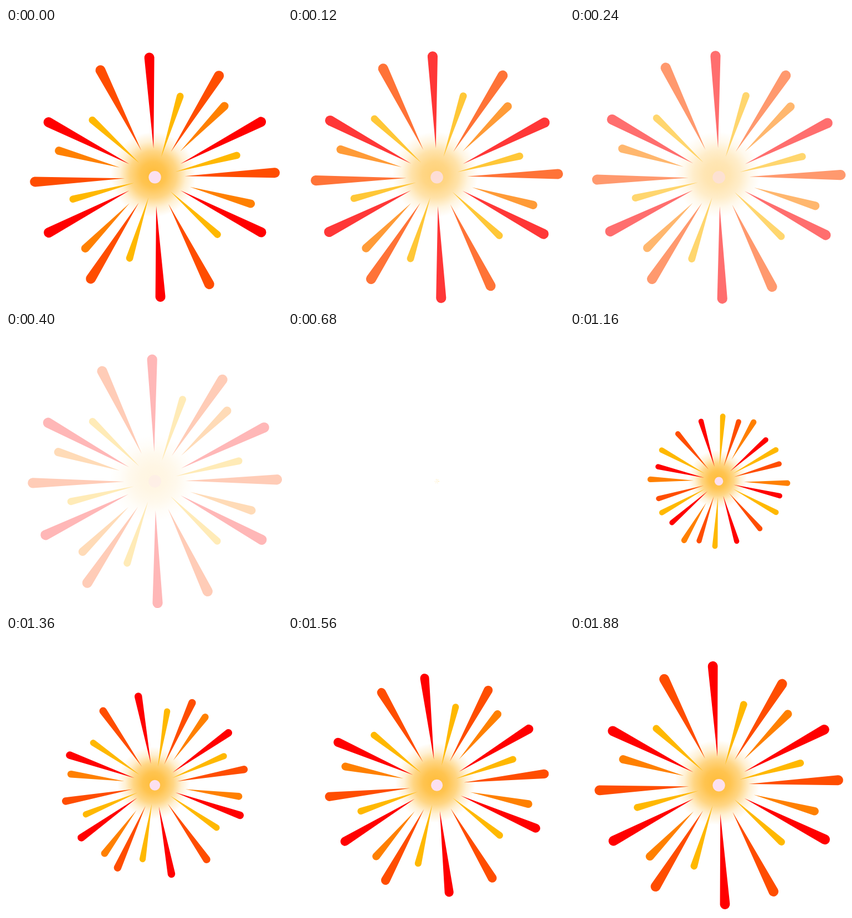
Animation of 498x498 px, one loop 1.92 s. Source, as an HTML page with a canvas:

```html
<!DOCTYPE html>
<html>
<head>
<meta charset="utf-8">
<title>Firework</title>
<style>
html, body { margin: 0; width: 100%; height: 100%; overflow: hidden; background: #fff; }
canvas { display: block; }
</style>
</head>
<body>
<canvas id="stage" width="498" height="498"></canvas>
<script>
const ctx = document.getElementById('stage').getContext('2d');
const LOOP = 1920, START = 670, FADE = 560;
const CX = 268.6, CY = 269.3, TAU = Math.PI * 2;

// Each ray is repeated on the opposite side; angles are clockwise from up.
const fast = { rate: 1.13, power: 1.38 };
const groups = [
  { color: '#ffb800', reach: 157, inner: 0.25, rate: 1.374, power: 1.05, angles: [18.9, 76.6, 134] },
  { color: '#ff8000', reach: 182.5, inner: 0.365, ...fast, angles: [45.9, 107] },
  { color: '#ff4d00', reach: 220.5, inner: 0.25, rate: 0.717, power: 1.84, angles: [33.8, 89.4, 154.6] },
  { color: '#ff0000', reach: 220, inner: 0.24, rate: 0.717, power: 1.84, angles: [-1.1, 64, 118.9] }
];

// Growth from 0 to 1 with a soft landing.
const grow = (age, { rate, power }) => 1 - Math.exp(-rate * (age / 490) ** power);

function disc(x, y, r, fill) {
  ctx.fillStyle = fill;
  ctx.beginPath();
  ctx.arc(x, y, r, 0, TAU);
  ctx.fill();
}

function glow(scale) {
  const x = -3 * scale, y = -5 * scale, r = 78 * scale;
  const fill = ctx.createRadialGradient(x, y, 0, x, y, r);
  for (const [stop, alpha] of [[0, 1], [0.3, 0.88], [0.55, 0.62], [0.78, 0.22], [1, 0]])
    fill.addColorStop(stop, `rgba(255,188,56,${alpha})`);
  disc(x, y, r, fill);
}

// A drop: pointed towards the centre, round at the far end.
function ray(reach, inner, angle, color) {
  const r = reach * 0.0415, tip = reach * inner;
  const lean = Math.asin(r / (reach - tip));
  ctx.save();
  ctx.rotate(angle * Math.PI / 180);
  ctx.fillStyle = color;
  ctx.beginPath();
  ctx.moveTo(0, -tip);
  ctx.arc(0, -reach, r, Math.PI - lean, lean);
  ctx.fill();
  ctx.restore();
}

function draw(t) {
  ctx.globalAlpha = 1;
  ctx.fillStyle = '#fff';
  ctx.fillRect(0, 0, 498, 498);
  if (t >= FADE && t <= START) return;

  const age = (t - START + LOOP) % LOOP;
  const turn = (0.00114 * (2230 - age)) ** 4;
  const scale = grow(age, fast);
  const alpha = t < FADE ? 1 - t / FADE : 1;

  ctx.save();
  ctx.translate(CX, CY);
  ctx.globalAlpha = alpha ** 1.5; // the glow fades ahead of the rays
  glow(scale);
  ctx.globalAlpha = alpha;
  for (const g of groups) {
    const reach = g.reach * grow(age, g);
    for (const a of g.angles)
      for (const side of [0, 180]) ray(reach, g.inner, a + side - turn, g.color);
  }
  disc(0, 0, 11.4 * scale, '#fce0f0');
  ctx.restore();
}

const begin = performance.now();
function tick() {
  draw((performance.now() - begin) % LOOP);
  requestAnimationFrame(tick);
}
tick();
</script>
</body>
</html>
```
